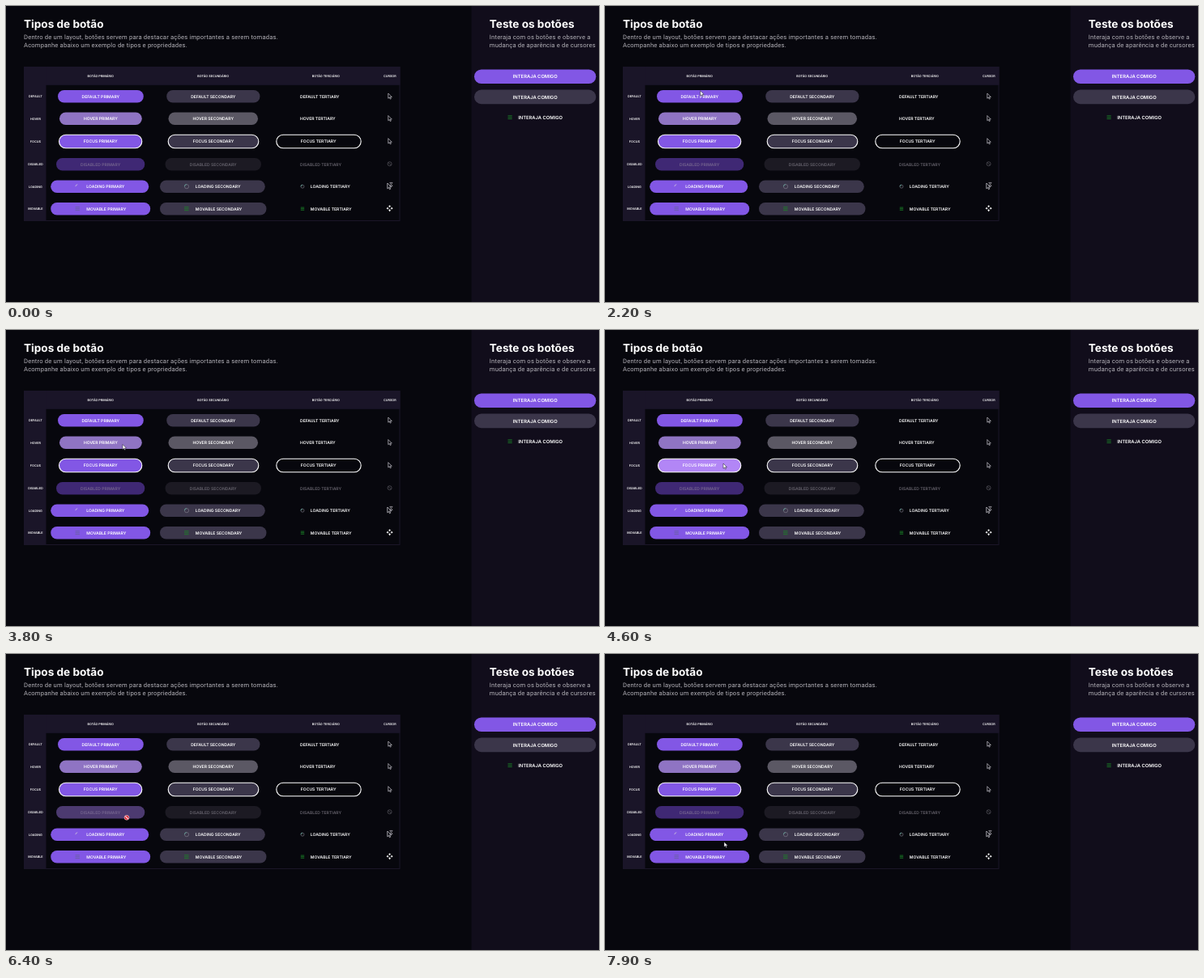
Write an HTML page that moves like this. It is 732 px wide and 366 px high and loops after 8000 ms.

```html
<!DOCTYPE html>
<html lang="pt-BR">
<head>
<meta charset="utf-8">
<title>Tipos de botão</title>
<style>
html, body { margin: 0; width: 100%; height: 100%; overflow: hidden; background: #07070d; }
svg { display: block; width: 100vw; height: 100vh; }
text { font-family: Inter, sans-serif; font-weight: 600; fill: #fff; text-rendering: geometricPrecision; }
.title { font-size: 13.6px; font-weight: 700; }
.body { font: 400 7.62px Roboto, sans-serif; letter-spacing: .19px; fill: #b3b1b8; }
.head { font-size: 3.78px; text-anchor: middle; }
.label { font-size: 5.07px; }
.big { font-size: 5.82px; }
.mid { text-anchor: middle; }
</style>
</head>
<body>
<svg id="stage" viewBox="0 0 732 366"></svg>
<script>
const LOOP = 8000, STEP = 100;
const PURPLE = '#8257e5', GREY = '#3b364a', GREEN = '#1b8427';

const rect = (x, y, w, h, fill, extra = '') =>
  `<rect x="${x}" y="${y}" width="${w}" height="${h}" fill="${fill}" ${extra}/>`;
const text = (x, y, str, cls, fill) =>
  `<text x="${x}" y="${y}" class="${cls}"${fill ? ` style="fill:${fill}"` : ''}>${str}</text>`;
const pill = (x1, x2, cy, fill, h = 15.4, extra = '') =>
  rect(x1, cy - h / 2, x2 - x1, h, fill, `rx="${h / 2}" ${extra}`);
const menu = (cx, cy, w, color) =>
  `<path d="${[-2, 0, 2].map(d => `M${cx - w / 2} ${cy + d * w / 5.5}h${w}`).join('')}" stroke="${color}" stroke-width=".8"/>`;
const spinner = (cx, cy, r, color, arc) =>
  `<circle cx="${cx}" cy="${cy}" r="${r}" fill="none" stroke="#8b8794" stroke-width=".7" opacity="${arc ? 0 : .8}"/>
   <path d="M${cx - r} ${cy}A${r} ${r} 0 0 1 ${cx} ${cy - r}" fill="none" stroke="${color}" stroke-width=".9"/>`;
const ARROW = 'M0 0V6.2L1.5 4.9L2.5 7.1L3.5 6.6L2.5 4.5H4.5Z';
const outlineArrow = (x, y, k = 1) =>
  `<path d="${ARROW}" transform="translate(${x} ${y}) scale(${k})" fill="none" stroke="#c9c7ce" stroke-width=".7"/>`;

// name, row centre, primary pill, secondary pill
const rows = [
  ['DEFAULT', 111.7, [64, 169.8], [198.2, 313.5]],
  ['HOVER', 139.2, [66, 167.8], [200.5, 311]],
  ['FOCUS', 167.5, [65.5, 167.8], [200.2, 311.8]],
  ['DISABLED', 195.7, [62, 171.3], [196.5, 315]],
  ['LOADING', 223.2, [55.2, 176.2], [190, 319.8]],
  ['MOVABLE', 250.7, [55.2, 178.2], [190, 321.5]]
];
const fills = {
  HOVER: ['#8f74c3', '#5b5864'],
  DISABLED: ['#3f2874', '#1c1a23']
};

function row([name, cy, first, second]) {
  const focus = name === 'FOCUS', off = name === 'DISABLED';
  const iconic = name === 'LOADING' || name === 'MOVABLE';
  const [c1, c2] = fills[name] || [PURPLE, GREY];
  const h = focus ? 16.6 : 15.4;
  const ring = focus ? 'stroke="#fff" stroke-width="1.1"' : '';
  const base = cy + 1.85;
  const center = ([a, b]) => (a + b) / 2;
  let s = text(36.4, cy + 1.4, name, 'head');
  s += pill(...first, cy, c1, h, `id="${name}" ${ring}`) + pill(...second, cy, c2, h, ring);
  if (focus) s += pill(333.8, 438.2, cy, 'none', h, ring);
  if (iconic) {
    s += text(99.3, base, name + ' PRIMARY', 'label');
    s += text(233.8, base, name + ' SECONDARY', 'label');
  } else {
    s += text(center(first), base, name + ' PRIMARY', 'label mid', off && '#75658f');
    s += text(center(second), base, name + ' SECONDARY', 'label mid', off && '#66636d');
  }
  s += text(iconic ? 375.8 : focus ? 363.8 : 363, base, name + ' TERTIARY', 'label', off && '#66636d');
  return s;
}

function scene() {
  let s = rect(0, 0, 732, 366, '#07070d') + rect(574.5, 0, 157.5, 366, '#110d1b');
  s += text(22, 26.8, 'Tipos de botão', 'title');
  s += text(22, 41.2, 'Dentro de um layout, botões servem para destacar ações importantes a serem tomadas.', 'body');
  s += text(22, 50.7, 'Acompanhe abaixo um exemplo de tipos e propriedades.', 'body');
  s += text(596.8, 26.8, 'Teste os botões', 'title');
  s += text(596.8, 41.2, 'Interaja com os botões e observe a', 'body');
  s += text(596.8, 50.7, 'mudança de aparência e de cursores', 'body');

  s += rect(22.5, 75.5, 463.5, 190, '#07070d', 'stroke="#1b1628"');
  s += rect(22, 75, 464.5, 22.8, '#1a1528') + rect(22, 75, 27.5, 191, '#1a1528');
  [[116.7, 'BOTÃO PRIMÁRIO'], [255.7, 'BOTÃO SECUNDÁRIO'], [394.8, 'BOTÃO TERCIÁRIO'], [473.8, 'CURSOR']]
    .forEach(([x, str]) => s += text(x, 88.3, str, 'head'));
  s += rows.map(row).join('');

  s += spinner(88.3, 223.2, 2.4, '#c3b6dc', true);
  s += spinner(223, 223.2, 2.6, '#5f9c94') + spinner(366, 223.2, 2, '#5f9c94');
  s += menu(88.2, 250.7, 5.4, '#68639f') + menu(222.8, 250.7, 5.5, GREEN) + menu(366, 250.7, 4.4, GREEN);

  [108, 135.5, 163.7].forEach(y => s += outlineArrow(471.8, y));
  s += '<path d="M471.9 193.4l3.5 3.6M476.1 195.2a2.5 2.5 0 1 1-5 0a2.5 2.5 0 1 1 5 0" fill="none" stroke="#5b5962" stroke-width=".7"/>';
  s += outlineArrow(470.8, 219, 1.1);
  s += '<path d="M473.6 218.4h3.6M473.6 222.6h3.6M474 218.4c0 2 2.8 2 2.8 4.2M476.8 218.4c0 2-2.8 2-2.8 4.2" fill="none" stroke="#c9c7ce" stroke-width=".6"/>';
  for (let a = 0; a < 360; a += 90)
    s += `<path d="M0-4L1.6-2.1H.4V-1.1H-.4V-2.1H-1.6Z" fill="#fff" transform="translate(473.6 250.2) rotate(${a})"/>`;

  s += pill(578, 728.3, 87.3, PURPLE, 17.6) + pill(578, 728.3, 112.4, GREY, 17.6);
  s += text(653.2, 89.4, 'INTERAJA COMIGO', 'big mid') + text(653.2, 114.5, 'INTERAJA COMIGO', 'big mid');
  s += menu(622.1, 137.6, 5.2, GREEN) + text(632.2, 139.7, 'INTERAJA COMIGO', 'big');

  s += `<g id="cursor">
    <path id="arrow" d="${ARROW}" fill="#fff" stroke="#15121c" stroke-width=".5"/>
    <circle id="busy" cx="6.2" cy="3" r="1.9" fill="none" stroke="#59b4e8" stroke-width="1"/>
    <g id="no"><circle r="2.9" fill="#d8202f" stroke="#f3dfe4" stroke-width=".6"/>
      <path d="M-1.6-1.6L1.6 1.6" stroke="#fff" stroke-width="1.1"/></g></g>`;
  return s;
}

// [time, x, y] of the pointer tip
const path = [
  [1800, 17, 56], [1900, 52, 74], [2000, 86, 91], [2200, 117.6, 104.8], [2500, 125, 123.5],
  [2700, 125, 123.5], [3100, 142, 138], [3500, 146, 140], [3800, 144, 141.5], [4400, 152, 160],
  [4600, 146, 165], [4900, 148, 174], [5200, 150.8, 181], [5400, 151, 186], [5800, 152, 196],
  [6000, 152, 196], [6400, 149, 202.3], [6800, 149, 214], [7000, 161, 220], [7200, 155, 221.5],
  [7500, 155, 221.5], [7900, 147, 232.4], [8000, 147, 232.4]
];

// linear interpolation over [time, ...values]
function along(keys, t) {
  let i = 1;
  while (i < keys.length - 1 && t > keys[i][0]) i++;
  const [a, b] = [keys[i - 1], keys[i]];
  const k = Math.min(1, Math.max(0, (t - a[0]) / (b[0] - a[0])));
  return a.slice(1).map((v, j) => v + (b[j + 1] - v) * k);
}
const rgb = c => [1, 3, 5].map(i => parseInt(c.slice(i, i + 2), 16));
const mix = (a, b, k) => {
  const to = rgb(b);
  return `rgb(${rgb(a).map((v, i) => Math.round(v + (to[i] - v) * k))})`;
};

const $ = id => document.getElementById(id);
$('stage').innerHTML = scene();

const glows = [
  ['DEFAULT', PURPLE, '#8f74c3', [[2200, 0], [2500, 1], [2700, 1], [2900, 0]]],
  ['FOCUS', PURPLE, '#b286f6', [[4400, 0], [4600, 1], [4900, 1], [5200, .12], [5300, 0]]],
  ['DISABLED', '#3f2874', '#4c3a70', [[5400, 0], [5700, 1], [6400, 1], [6700, 0]]]
];

function draw(t) {
  const [x, y] = along(path, t);
  const blocked = t >= 5500 && t < 6500;
  const show = (id, on) => $(id).setAttribute('visibility', on ? 'visible' : 'hidden');
  $('cursor').setAttribute('transform', `translate(${x.toFixed(2)} ${y.toFixed(2)})`);
  show('arrow', t >= 1800 && !blocked);
  show('no', blocked);
  show('busy', t >= 6900 && t < 7800);
  for (const [id, from, to, keys] of glows) $(id).setAttribute('fill', mix(from, to, along(keys, t)[0]));
}

const start = performance.now();
function tick() {
  const t = (performance.now() - start) % LOOP;
  draw(Math.floor(t / STEP) * STEP);
  requestAnimationFrame(tick);
}
tick();
</script>
</body>
</html>
```
